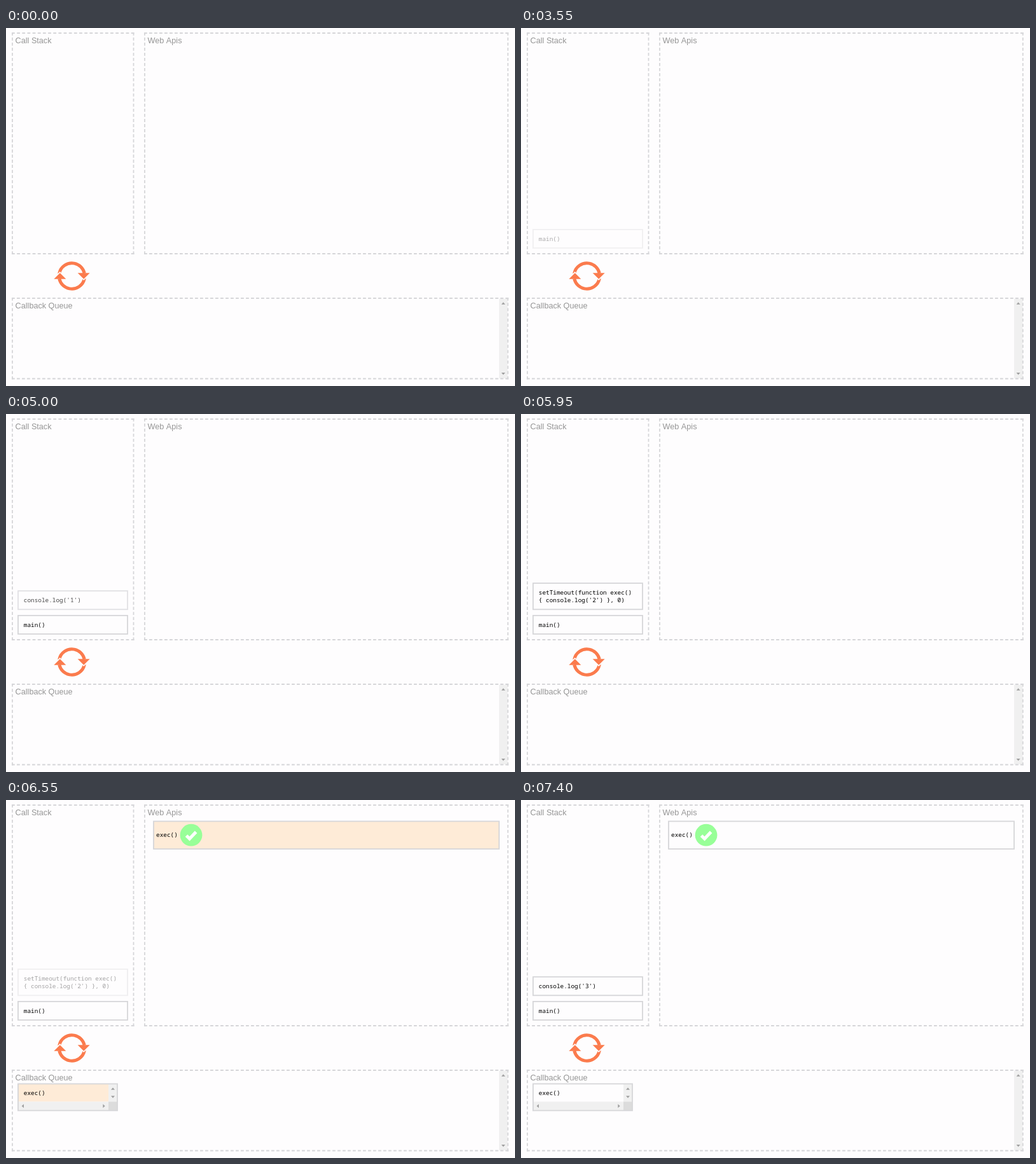
An HTML page with a canvas that plays this animation: 800 by 563 pixels, repeating every 8000 ms.

```html
<!DOCTYPE html>
<html lang="en">
<head>
<meta charset="utf-8">
<title>Event loop</title>
<style>
  html, body { margin: 0; width: 100%; height: 100%; overflow: hidden; background: #fefdfe; }
  canvas { display: block; width: 800px; height: 563px; }
</style>
</head>
<body>
<canvas id="stage" width="800" height="563"></canvas>
<script>
const ctx = document.getElementById('stage').getContext('2d');
const LOOP = 8000, STEP = 50;
const BG = '#fefdfe', LINE = '#d6d6d9', TRACK = '#f0f0f0', ARROW = '#a0a0a0', ORANGE = '#fb7b4d';
const LABEL = '12.65px "Liberation Sans", Arial, sans-serif';
const CODE = '9.39px "Noto Sans Mono", monospace';

// Stack entries: fade in over [in0, in1], fade out over [out0, out1].
const calls = [
  { lines: ['main()'], bottom: 346, in0: 3500, in1: 3650 },
  { lines: ["console.log('1')"], bottom: 307.3, in0: 4200, in1: 4350, out0: 4960, out1: 5100 },
  { lines: ['setTimeout(function exec()', "{ console.log('2') }, 0)"], bottom: 307.3,
    in0: 5710, in1: 5920, out0: 6460, out1: 6600 },
  { lines: ["console.log('3')"], bottom: 307.3, in0: 7215, in1: 7400 }
];
const EXEC_START = 6500, FLASH = 250;

const ramp = (t, a, b) => Math.min(1, Math.max(0, (t - a) / (b - a)));

function text(str, x, y, font, color) {
  ctx.font = font;
  ctx.fillStyle = color;
  ctx.fillText(str, x, y);
}

function rect(x, y, w, h, color) {
  ctx.fillStyle = color;
  ctx.fillRect(x, y, w, h);
}

function poly(points, color) {
  ctx.fillStyle = color;
  ctx.beginPath();
  points.forEach(([x, y]) => ctx.lineTo(x, y));
  ctx.fill();
}

function frame(x, y, w, h) {
  ctx.strokeStyle = LINE;
  ctx.lineWidth = 1.8;
  ctx.strokeRect(x, y, w, h);
}

// Dashes start and end whole on every side; the gap adapts to the length.
function dashedLine(x1, y1, x2, y2) {
  const len = Math.hypot(x2 - x1, y2 - y1), dash = 4.8;
  const count = Math.round((len + 3.2) / (dash + 3.2));
  ctx.setLineDash([dash, (len - count * dash) / (count - 1)]);
  ctx.beginPath();
  ctx.moveTo(x1, y1);
  ctx.lineTo(x2, y2);
  ctx.stroke();
}

function panel(label, x, y, r, b) {
  ctx.strokeStyle = LINE;
  ctx.lineWidth = 1.8;
  dashedLine(x - 1, y, r + 1, y);
  dashedLine(x - 1, b, r + 1, b);
  dashedLine(x, y - 1, x, b + 1);
  dashedLine(r, y - 1, r, b + 1);
  ctx.setLineDash([]);
  text(label, x + 4.6, y + 16, LABEL, '#969696');
}

// Small scrollbar arrow pointing along (dx, dy).
function arrow(x, y, dx, dy) {
  const tip = 1.7, half = 3;
  poly([
    [x + dx * tip, y + dy * tip],
    [x - dx * tip - dy * half, y - dy * tip - dx * half],
    [x - dx * tip + dy * half, y - dy * tip + dx * half]
  ], ARROW);
}

function loopIcon() {
  ctx.save();
  ctx.translate(103.5, 390);
  for (let i = 0; i < 2; i++) {
    ctx.strokeStyle = ORANGE;
    ctx.lineWidth = 5;
    ctx.beginPath();
    ctx.arc(0, 0, 20.2, Math.PI * 1.06, Math.PI * 1.93);
    ctx.stroke();
    ctx.rotate(Math.PI);
  }
  const head = [[9.2, -4.8], [18.7, 4.8], [28.2, -4.8]];
  for (let i = 0; i < 2; i++) {
    ctx.strokeStyle = BG;
    ctx.lineWidth = 3;
    ctx.beginPath();
    head.forEach(([x, y]) => ctx.lineTo(x, y));
    ctx.stroke();
    poly(head, ORANGE);
    ctx.rotate(Math.PI);
  }
  ctx.restore();
}

function call(c, t) {
  const alpha = ramp(t, c.in0, c.in1) * (c.out0 ? 1 - ramp(t, c.out0, c.out1) : 1);
  if (!alpha) return;
  const h = 17 + 12.1 * c.lines.length;
  const top = c.bottom - h;
  ctx.globalAlpha = alpha;
  frame(19, top, 172, h);
  c.lines.forEach((line, i) => text(line, 27.8, top + 17.7 + i * 12.1, CODE, '#000'));
  ctx.globalAlpha = 1;
}

function checkMark(x, y) {
  ctx.fillStyle = '#98ff98';
  ctx.beginPath();
  ctx.arc(x, y, 17.4, 0, Math.PI * 2);
  ctx.fill();
  ctx.strokeStyle = '#fff';
  ctx.lineWidth = 5;
  ctx.beginPath();
  ctx.moveTo(x - 7.5, y + 0.8);
  ctx.lineTo(x - 2.5, y + 5.8);
  ctx.lineTo(x + 7.6, y - 5);
  ctx.stroke();
}

function execCells(t) {
  const glow = 1 - ramp(t, EXEC_START, EXEC_START + FLASH);
  const fill = `rgb(254, ${253 - 23 * glow}, ${254 - 49 * glow})`;

  rect(232, 33.5, 543, 43.5, fill);
  frame(232, 33.5, 543, 43.5);
  text('exec()', 236, 58, CODE, '#000');
  checkMark(291, 55.2);

  rect(19, 446.4, 142, 28, fill);
  rect(161, 446.4, 14, 28, TRACK);
  rect(19, 474.4, 142, 14, TRACK);
  rect(161, 474.4, 14, 14, '#dcdcdc');
  frame(19, 446.4, 156, 42);
  text('exec()', 27.8, 464.3, CODE, '#000');
  arrow(168, 454, 0, -1);
  arrow(168, 467, 0, 1);
  arrow(26.3, 481.3, -1, 0);
  arrow(154, 481.3, 1, 0);
}

function draw(t) {
  rect(0, 0, 800, 563, BG);
  rect(775, 426, 13.5, 125, TRACK);
  arrow(781.6, 433, 0, -1);
  arrow(781.6, 543.7, 0, 1);
  panel('Call Stack', 10, 8, 200.5, 355);
  panel('Web Apis', 218, 8, 788.8, 355);
  panel('Callback Queue', 10, 425, 788.8, 551.5);
  loopIcon();
  calls.forEach(c => call(c, t));
  if (t >= EXEC_START) execCells(t);
}

const start = performance.now();
function tick() {
  const t = (performance.now() - start) % LOOP;
  draw(Math.floor(t / STEP) * STEP);
  requestAnimationFrame(tick);
}
tick();
</script>
</body>
</html>
```
